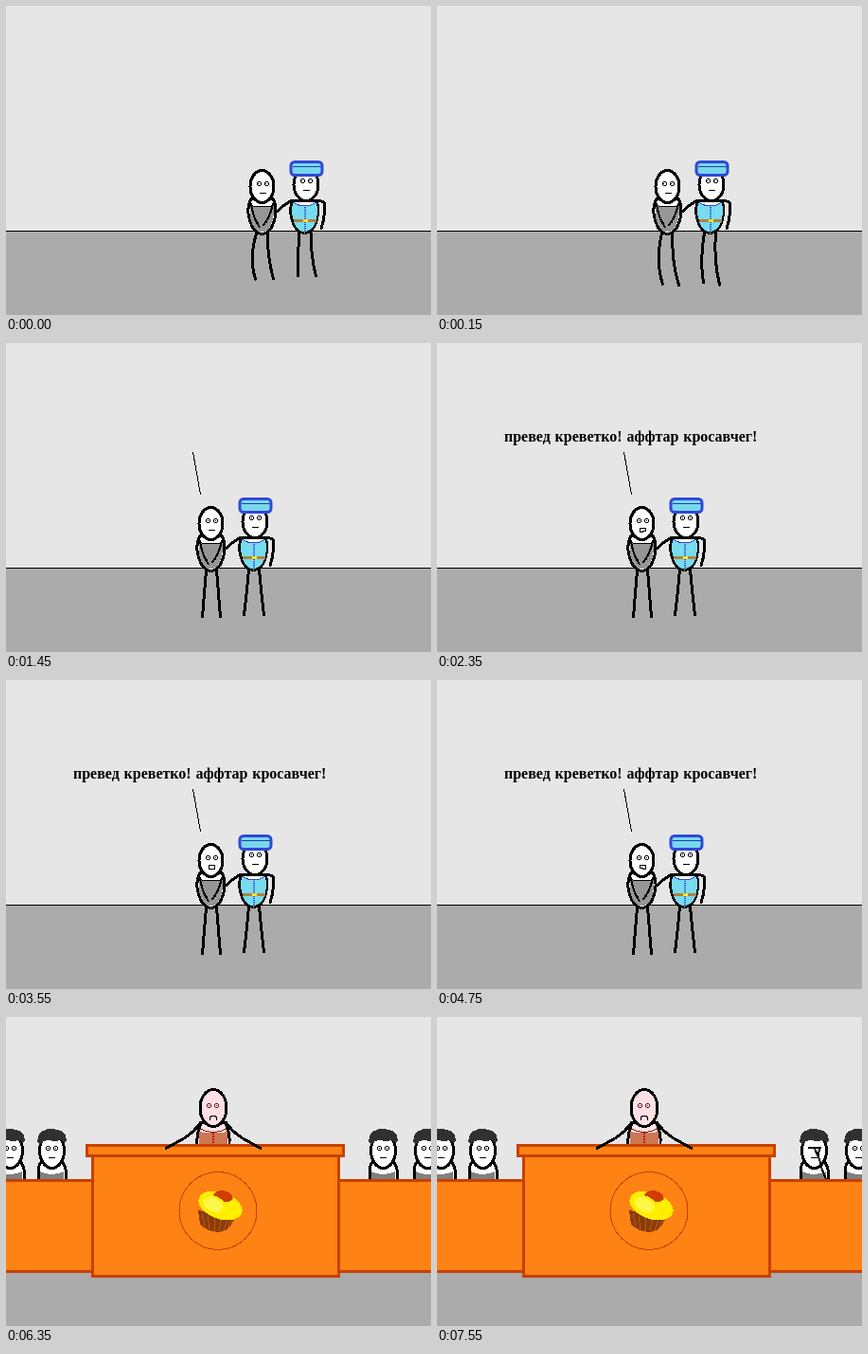
Animation of 449 by 326 pixels, one loop 8000 ms. Source, as an HTML page:

```html
<!DOCTYPE html>
<html lang="ru">
<head>
<meta charset="utf-8">
<style>
html, body { margin: 0; width: 100%; height: 100%; overflow: hidden; background: #e6e6e6; }
svg { display: block; width: 449px; height: 326px; }
text { font: bold 16px "Liberation Serif", serif; word-spacing: .7px; }
.ink { fill: none; stroke: #000; stroke-width: 3; stroke-linecap: round; stroke-linejoin: round; }
.thin { fill: none; stroke: #000; stroke-width: 1; }
.wood { fill: #ff8214; stroke: #c84000; stroke-width: 3; }
</style>
</head>
<body>
<svg viewBox="0 0 449 326" shape-rendering="crispEdges">
  <defs>
    <path id="eye" d="M-1 -2h3v1h-3zM-1 2h3v1h-3zM-2 -1h1v3h-1zM2 -1h1v3h-1z"/>
    <g id="guest">
      <path class="ink" style="fill:#fff" d="M34 172V161Q35 154 39 151H58Q62 155 63 161V172"/>
      <path fill="#808080" d="M36 163Q48 169 61 163V172H36Z"/>
      <ellipse class="ink" style="fill:#fff" cx="48.5" cy="141" rx="13" ry="18.5"/>
      <path fill="#303030" d="M33 132L34 126L37 121L43 118.500L49 118L55 119L60 121L63 125L64 131L61 133L58 130L51 131L45 130L39 131L36 134Z"/>
      <path class="thin" d="M45 148.500H52"/>
    </g>
    <g id="look">
      <use href="#eye" x="44" y="138"/><use href="#eye" x="52" y="138"/>
      <path d="M44 138h1v1h-1zM52 138h1v1h-1z"/>
    </g>
  </defs>

  <rect width="449" height="326" fill="#e6e6e6"/>
  <rect y="237" width="449" height="89" fill="#ababab"/>

  <g id="street">
    <path class="thin" d="M0 237.500H449"/>
    <g id="pair">
      <path id="legs" class="ink" transform="translate(.5)"/>
      <!-- prisoner -->
      <path class="ink" style="fill:#fff" d="M205 203Q200 214 203 224Q207 240 216.500 240.500Q226 240 230 224Q233 213 228 203Z"/>
      <path fill="#969696" d="M204 210Q216 214 229 210Q230 227 223 236Q216 241 210 236Q202 227 204 210Z"/>
      <path class="thin" d="M204 210.500Q216 213.500 229 210.500"/>
      <path class="ink" style="stroke-width:2" d="M205 209Q207 223 213 232M228 209Q225 223 218 231"/>
      <path class="thin" d="M210 228.500H213M219 228.500H222M213 233.500H215"/>
      <ellipse class="ink" style="fill:#fff" cx="216.500" cy="190.500" rx="12.500" ry="17"/>
      <use href="#eye" x="213" y="187"/><use href="#eye" x="221" y="187"/>
      <path id="mouth" class="thin"/>
      <!-- guard -->
      <path class="ink" d="M248 205Q239 210 232 217M276 205L282 207Q284 219 279 235"/>
      <path class="ink" style="fill:#fff" d="M249 205Q245 214 248 225Q252 239 261.500 239.500Q271 239 274.500 225Q277 214 274 205Z"/>
      <path fill="#78dcf0" d="M249 207Q262 215 274 207Q277 222 270 234Q261 242 253 234Q246 222 249 207Z"/>
      <path class="thin" d="M249 207Q262 215 274 207" style="stroke:#3040d0"/>
      <path d="M262 212V238" fill="none" stroke="#3040d0" stroke-width="2" stroke-dasharray="1 1"/>
      <path d="M250 226.500H274" fill="none" stroke="#b08040" stroke-width="3"/>
      <rect x="260" y="225" width="5" height="3" fill="#ffe820"/>
      <ellipse class="ink" style="fill:#fff" cx="263" cy="188.500" rx="13" ry="17"/>
      <use href="#eye" x="259" y="184"/><use href="#eye" x="267" y="184"/>
      <path class="thin" d="M260 194.500H267"/>
      <rect x="247" y="164.500" width="33" height="14" rx="4" fill="#78d8ec" stroke="#3048d8" stroke-width="3" shape-rendering="auto"/>
      <path class="thin" d="M249 169.500H279" style="stroke:#2040a0"/>
      <path id="pupils" d="M213 187h1v1h-1zM221 187h1v1h-1zM259 184h1v1h-1zM267 184h1v1h-1z"/>
    </g>
    <path id="tail" class="thin" d="M197.500 115L205.500 160"/>
    <text id="speech" x="71" y="104">превед креветко! аффтар кросавчег!</text>
  </g>

  <g id="court">
    <use href="#guest" x="-44"/><use href="#look" x="-44"/>
    <use href="#guest"/><use href="#look"/>
    <use href="#guest" x="350"/><use id="watch" href="#look" x="350"/>
    <use href="#guest" x="397"/><use href="#look" x="397"/>
    <path id="arm" class="ink" style="stroke-width:2"/>
    <rect class="wood" x="-5" y="172.500" width="97" height="96"/>
    <rect class="wood" x="351" y="172.500" width="103" height="96"/>
    <!-- judge -->
    <path class="ink" style="fill:#ffe0e4" d="M202 136Q201 120 207 111H231Q237 120 236 136"/>
    <path fill="#cd7855" d="M204 121Q219 124 234 121V136H204Z"/>
    <path class="thin" d="M205 118Q219 125 233 118" style="stroke:#802010"/>
    <path d="M219 122V136" fill="none" stroke="#d00010" stroke-width="2" stroke-dasharray="2 1"/>
    <ellipse class="ink" style="fill:#ffe0e4" cx="219" cy="96" rx="14" ry="19.500"/>
    <g fill="#701818">
      <use href="#eye" x="214" y="93"/><use href="#eye" x="222" y="93"/>
      <path d="M214 93h1v1h-1zM222 93h1v1h-1z"/>
    </g>
    <path class="thin" d="M215.500 109V106L217 104.500H221L222.500 106V109"/>
    <!-- bench -->
    <rect class="wood" x="91.500" y="146.500" width="260" height="127"/>
    <rect class="wood" x="85.500" y="135.500" width="271" height="11"/>
    <path class="ink" d="M206 111Q198 122 188 128L169 138.500M232 111Q240 122 250 128L269 138.500"/>
    <circle cx="224" cy="204.500" r="41" fill="none" stroke="#c84000"/>
    <path fill="#8c3c0a" d="M203 204L205 218Q211 226 224 227Q233 226 237 221L243 210Z"/>
    <path d="M207 207L210 221M213 210L215 224M220 212L220 226M227 214L225 226M234 214L230 225M239 213L234 223" fill="none" stroke="#b45a14"/>
    <ellipse cx="226.500" cy="199" rx="24" ry="14" transform="rotate(19 226.500 199)" fill="#ffee00"/>
    <ellipse cx="219" cy="198" rx="11" ry="7" transform="rotate(24 219 198)" fill="#fff64a"/>
    <path fill="#d23c00" d="M218 188Q222 183 229 183Q238 184 240 192Q236 196 230 195Q225 189 218 188Z"/>
  </g>
</svg>
<script>
const $ = id => document.getElementById(id);
const show = (id, on) => $(id).style.display = on ? "" : "none";

// each leg: hip, knee control and foot, for both walkers
const first = [210,240,202,266,209,288, 222,240,221,262,228,288, 255,240,254,262,254,285, 268,240,267,262,273,285];
const last = [210,240,204,274,213,293, 221,240,219,274,228,295, 255,238,246,274,254,293, 266,238,262,272,269,297];
const still = [211,240,209,264,207,289, 222,240,224,264,226,289, 256,239,254,263,251,287, 267,239,269,263,272,287];
const middle = first.map((v, i) => (v + last[i]) / 2 + (i % 6 === 5 ? 3 : 0));

// lower lip heights, left and right, while talking
const lips = [[199, 199], [199, 198], [198, 198], [200, 200], [199, 200], [200, 199], [198, 199]];
const waves = ["M409 171L417 162L418 156", "M409 171L417 159L410 146L405 142",
  "M411 171L406 159L404 150L399 139M393 138H405M404 138L403 146"];

function legs(p) {
  let d = "";
  for (let i = 0; i < p.length; i += 6)
    d += `M${p[i]} ${p[i + 1]}Q${p[i + 2]} ${p[i + 3]} ${p[i + 4]} ${p[i + 5]}`;
  return d;
}

function mouth(t) {
  if (t < 2150 || t >= 4950) return "M214 197.500H221";
  const [l, r] = lips[Math.floor((t - 2150) / 200) % 7];
  return `M214.500 195.500H220.500V${r + .5}L214.500 ${l + .5}Z`;
}

function draw(t) {
  const court = t >= 6350, step = Math.min(2, Math.floor((t - 7350) / 100));
  show("street", !court);
  show("court", court);
  const pose = t < 150 ? first : t < 300 ? middle : t < 450 ? last : still;
  const shift = t < 150 ? 54 : t < 300 ? 27 : 0;
  $("pair").setAttribute("transform", `translate(${shift})`);
  $("legs").setAttribute("d", legs(pose));
  $("pupils").setAttribute("transform", `translate(${t < 450 ? -1 : 0})`);
  $("mouth").setAttribute("d", mouth(t));
  show("tail", t >= 1450 && t < 5350);
  show("speech", t >= 1650 && t < 5150);
  show("arm", step >= 0);
  show("watch", step < 2);
  if (step >= 0) $("arm").setAttribute("d", waves[step]);
}

const start = performance.now();
function tick() {
  draw((performance.now() - start) % 8000);
  requestAnimationFrame(tick);
}
tick();
</script>
</body>
</html>
```
